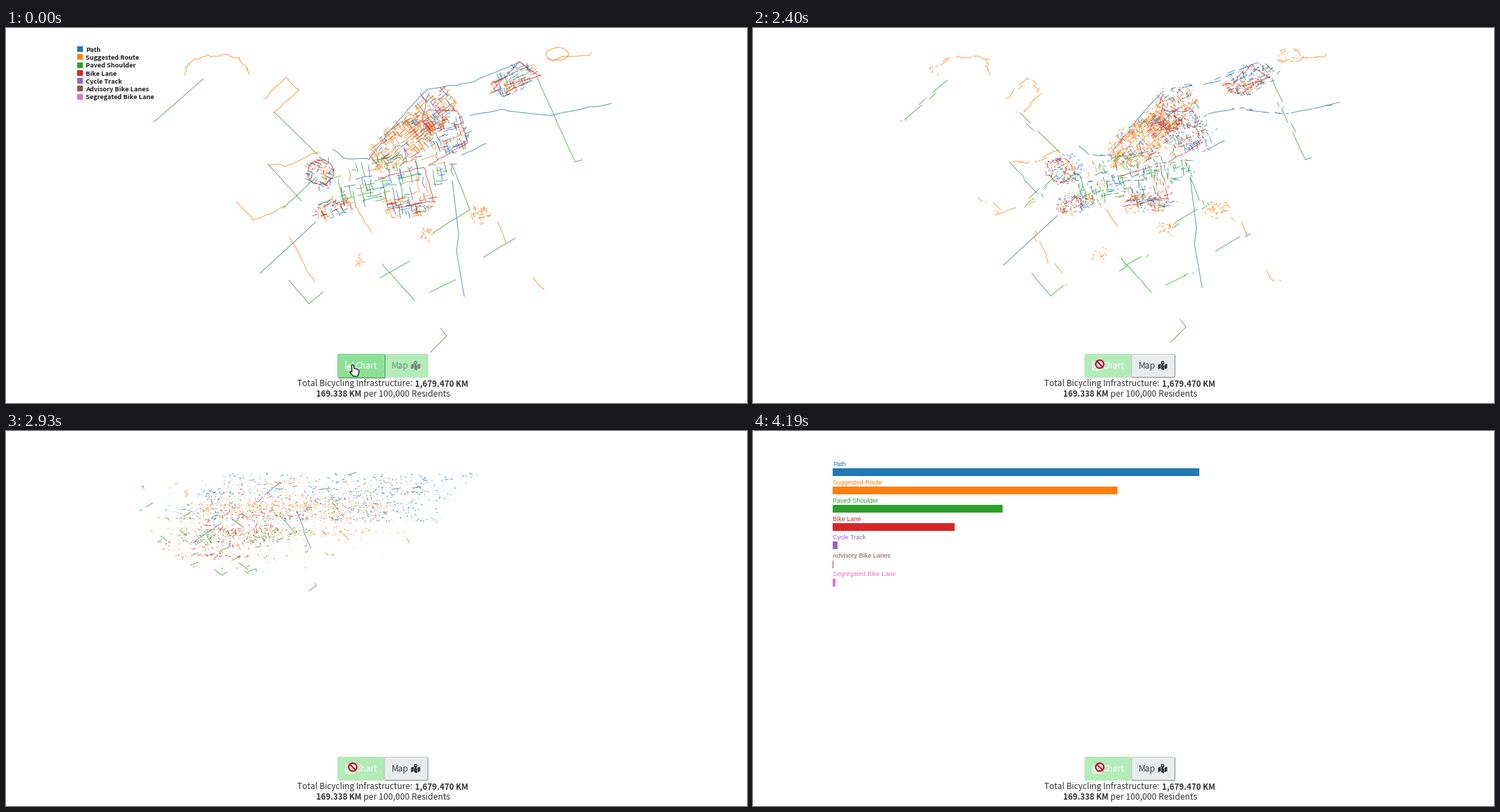
A matplotlib script for the animation above (6.04 s loop, 1051x533 px).

```python
import matplotlib.pyplot as plt
import numpy as np
from matplotlib.animation import FuncAnimation
from matplotlib.patches import Circle, FancyBboxPatch, Polygon, Rectangle

W, H, DPI = 1051, 533, 64
LOOP, TICK = 6040, 20
PX = 72 / DPI
SANS, ARIAL = "Noto Sans CJK JP", "Liberation Sans"
PRESS, CLICK, REFRESH = 1960, 2070, 66
STALL = (3000, 3170)

# Route kinds: key, name, length of the bar
KINDS = [("b", "Path", 520), ("o", "Suggested Route", 404),
         ("g", "Paved Shoulder", 241), ("r", "Bike Lane", 173),
         ("c", "Cycle Track", 7), ("a", "Advisory Bike Lanes", 1),
         ("s", "Segregated Bike Lane", 3.6)]
BAR_X, BAR_Y, BAR_H, BAR_STEP = 113, 53, 11, 26.1

# Key points of the main roads
ROADS = {
    "g": [[(209, 134), (247, 101), (280, 72)], [(380, 119), (442, 180)],
          [(371, 193), (419, 246)], [(393, 256), (440, 212)],
          [(401, 358), (430, 392), (450, 375)], [(531, 355), (573, 331)],
          [(533, 335), (580, 388)], [(600, 376), (638, 358)],
          [(677, 326), (723, 298)], [(606, 291), (658, 258), (632, 192)],
          [(752, 68), (807, 190), (818, 187)]],
    "o": [[(363, 102), (397, 71), (415, 88), (380, 120)],
          [(371, 193), (398, 196), (445, 175)],
          [(327, 247), (352, 273), (395, 255)], [(402, 296), (436, 360)],
          [(519, 292), (497, 255)], [(697, 276), (709, 305)],
          [(766, 45), (831, 36)], [(750, 355), (761, 371)]],
    "b": [[(515, 187), (545, 145), (597, 87), (660, 78), (728, 48), (745, 64)],
          [(658, 124), (705, 116), (770, 124), (859, 107)],
          [(464, 172), (480, 185), (515, 187)], [(646, 182), (681, 164)]],
    "r": [[(528, 214), (593, 198), (608, 246), (540, 258)],
          [(601, 92), (590, 130), (604, 152)],
          [(600, 118), (640, 117), (655, 163), (600, 194)],
          [(690, 88), (728, 48), (757, 69), (705, 82)]],
}
WOBBLE = {"g": 0.2, "o": 1.2, "b": 0.6, "r": 0.8}
PIECE = {"g": 17, "o": 9, "b": 12, "r": 6}

# Town areas: mix of kinds, centre, radii, street angle
TOWNS = [("ooooobr", 562, 163, 52, 27, -38), ("ooobbr", 603, 120, 42, 24, -38),
         ("oobbbr", 628, 150, 28, 30, -20), ("oobbbr", 718, 74, 36, 18, -25),
         ("obbbr", 445, 206, 20, 22, 25), ("oobbr", 464, 256, 30, 14, -22),
         ("oobbr", 573, 252, 36, 16, -12), ("o", 597, 295, 10, 9, 40),
         ("o", 672, 266, 13, 13, -15), ("o", 502, 331, 7, 8, -30)]

rng = np.random.default_rng(7)
runs = {key: [] for key, _, _ in KINDS}


def ellipse(cx, cy, rx, ry, turns=1.0, n=14):
    a = np.pi * (1 + 2 * turns * np.linspace(0, 1, n))
    return np.c_[cx + rx * np.cos(a), cy + ry * np.sin(a)]


def trace(pts, s, d):
    return np.c_[np.interp(s, d, pts[:, 0]), np.interp(s, d, pts[:, 1])]


def distance(pts):
    return np.r_[0, np.cumsum(np.hypot(*np.diff(pts, axis=0).T))]


def add_path(key, pts, step=1e4, wobble=0, slot=None):
    """Cut a route at random into runs; slot is the place along the bar."""
    pts = np.array(pts, float)
    d = distance(pts)
    if wobble:
        s = np.union1d(d, np.arange(0, d[-1], 9))
        pts = trace(pts, s, d) + rng.normal(0, wobble, (len(s), 2))
        d = distance(pts)
    cuts = np.sort(np.r_[0, rng.uniform(0, d[-1], round(d[-1] / step)), d[-1]])
    for a, b in zip(cuts, cuts[1:]):
        run = trace(pts, np.r_[a, d[(d > a) & (d < b)], b], d)
        if run[0, 0] > run[-1, 0]:
            run = run[::-1]
        runs[key].append((rng.random() if slot is None else slot, run))


def add_town(mix, cx, cy, rx, ry, deg, density=0.14):
    """Short streets on a turned grid inside an ellipse."""
    c, s = np.cos(np.radians(deg)), np.sin(np.radians(deg))
    for _ in range(int(rx * ry * density)):
        r, a = np.sqrt(rng.random()), rng.uniform(0, 2 * np.pi)
        mid = r * np.array([rx * np.cos(a), ry * np.sin(a)])
        axis = int(rng.random() < 0.45)
        mid[1 - axis] = 4 * round(mid[1 - axis] / 4)
        half = np.zeros(2)
        half[axis] = rng.uniform(1.5, 3 + rx / 10)
        pts = np.array([mid - half, mid, mid + half]) + rng.normal(0, 0.8, (3, 2))
        add_path(rng.choice(list(mix)), pts @ [[c, s], [-s, c]] + (cx, cy),
                 2.5 + rx / 20)


for town in TOWNS:
    add_town(*town)
add_town("bbbgggo", 545, 212, 95, 32, -12, density=0.035)
for key, roads in ROADS.items():
    for road in roads:
        add_path(key, road, PIECE[key], WOBBLE[key])
add_path("o", ellipse(299, 66, 46, 28, 0.5), 9, 1.5)
add_path("o", ellipse(782, 37, 16, 9), 9, 0.5)
add_path("r", ellipse(446, 205, 19, 18), 6, 0.6)
add_path("b", [(360, 349), (440, 275)], slot=0.25)
add_path("b", [(633, 217), (642, 293), (639, 317), (650, 382)], slot=0.38)
add_path("g", [(602, 461), (625, 438), (616, 426)], slot=1)
for key in "cas":
    add_path(key, ellipse(595, 140, 12, 8, 0.3), 4)


def bar_base(i):
    return BAR_Y + BAR_STEP * i + BAR_H


def layout(i):
    """Map and chart points of one kind, runs parted by NaN rows."""
    key, _, width = KINDS[i]
    ordered = [run for _, run in sorted(runs[key], key=lambda item: item[0])]
    scale = width / sum(distance(run)[-1] for run in ordered)
    gap = np.full((1, 2), np.nan)
    start, end, x = [], [], BAR_X
    for run in ordered:
        d = distance(run) * scale
        start += [run, gap]
        end += [np.c_[x + d, np.full(len(d), bar_base(i))], gap]
        x += d[-1]
    return np.vstack(start), np.vstack(end)


fig = plt.figure(figsize=(W / DPI, H / DPI), dpi=DPI, facecolor="white")
ax = fig.add_axes([0, 0, 1, 1])
ax.set(xlim=(0, W), ylim=(H, 0))
ax.axis("off")


def text(x, y, s, px, color="#333333", font=SANS, **kw):
    return ax.text(x, y, s, fontsize=px * PX, color=color, family=font,
                   va="baseline", **kw)


def line(pts, color, px=1, **kw):
    x, y = zip(*pts)
    return ax.plot(x, y, color=color, lw=px * PX, **kw)[0]


def shape(patch, color, edge="none", px=0, **kw):
    patch.set(facecolor=color, edgecolor=edge, linewidth=px * PX, **kw)
    return ax.add_patch(patch)


def button(x, w):
    box = FancyBboxPatch((x, 463.5), w, 33, boxstyle="round,pad=0,rounding_size=2.5")
    return shape(box, "white", px=1)


# Map routes, bars, captions and legend
layouts = [layout(i) for i in range(len(KINDS))]
routes, bars, captions, legend = [], [], [], []
for i, (_, name, width) in enumerate(KINDS):
    color = f"C{i}"
    routes.append(line(layouts[i][0], color, alpha=0.75, solid_capstyle="butt"))
    bars.append(shape(Rectangle((BAR_X, bar_base(i)), width, 0), color))
    captions.append(text(BAR_X, 49.5 + BAR_STEP * i, name, 9, color, ARIAL))
    y = 30.2 + 11.25 * i
    legend.append(shape(Rectangle((101, y - 4), 8, 8), color))
    legend.append(text(113, y + 3.6, name, 9.1, "#1a1a1a", weight="bold"))

# Buttons
chart_box, map_box = button(470.5, 66.5), button(537, 61.5)
chart_edge = line([(471, 496.5), (536.5, 496.5), (536.5, 464)], "#3f9a55")
map_edge = line([(538, 496.5), (597, 496.5), (598.5, 495), (598.5, 465)], "#85888b")
line([(481.5, 474), (481.5, 485.5), (494, 485.5)], "white", 1.5)
for i, top in enumerate([480, 476.5, 479, 475]):
    x = 484.5 + 2.5 * i
    line([(x, 483.5), (x, top)], "white", 1.6, solid_capstyle="butt")
text(526.5, 484.3, "Chart", 12, "white", ha="right")
map_ink = [text(547, 484.3, "Map", 12)]
for x, tilt in [(574.5, -1.5), (579, 1.5), (583.5, -1.5)]:
    panel = [(x, 478.5), (x + 4, 478.5 + tilt), (x + 4, 485 + tilt), (x, 485)]
    map_ink.append(shape(Polygon(panel), "#333333"))
map_ink.append(shape(Polygon([(578.5, 476), (583.5, 476), (581, 481)]), "#333333"))
map_ink.append(shape(Circle((581, 475.5), 2.4), "#333333"))
map_hole = shape(Circle((581, 475.4), 0.9), "white")

# Totals
text(413, 509.3, "Total Bicycling Infrastructure:", 11.8)
text(656, 509.3, "1,679.470 KM", 11.5, weight="bold", ha="right")
text(439.5, 524.3, "169.338 KM", 11.4, weight="bold")
text(630, 524.3, "per 100,000 Residents", 12, ha="right")

# Pointers
glow = shape(Circle((491.5, 477.5), 10.5), "#dcdc00", alpha=0.7, zorder=5)
hand = shape(Polygon([(490.3, 479.5), (491.7, 478.3), (493.2, 479.5), (493.6, 484),
                      (498, 485), (500.6, 487), (500.4, 491), (498.6, 495),
                      (492.6, 495), (488, 489.6), (488.4, 487.6), (490.8, 489)]),
             "white", "black", 1.1, zorder=6)
stop = [shape(Circle((491.8, 477.8), 5.6), "white", "#c4122f", 2.2, zorder=6),
        line([(487.9, 473.9), (495.7, 481.7)], "#c4122f", 2.2, zorder=6)]


def ramp(t, start, length):
    return float(np.clip((t - start) / length, 0, 1))


def cubic(u):
    return 4 * u ** 3 if u < 0.5 else 1 - 4 * (1 - u) ** 3


def refreshed(now):
    """Time of the last screen refresh, with one short stall."""
    if STALL[0] <= now < STALL[1]:
        now = STALL[0]
    return now - (now - CLICK) % REFRESH if now >= CLICK else now


def draw(frame):
    t = refreshed(frame * TICK + TICK // 2)
    clicked = t >= CLICK

    p = cubic(ramp(t, 2076, 1500))
    for art, (a, b) in zip(routes, layouts):
        art.set_data(*(a * (1 - p) + b * p).T)
        art.set_visible(p < 1)

    grow = 1 - (1 - ramp(t, 3545, 440)) ** 3
    for i, bar in enumerate(bars):
        bar.set_y(bar_base(i) - BAR_H * grow)
        bar.set_height(BAR_H * grow)
        bar.set_visible(p == 1)
    for art in captions:
        art.set_alpha(ramp(t, 3720, 440))
    for art in legend:
        art.set_alpha(1 - ramp(t, CLICK, 250))

    idle = "#e9ebed" if clicked else "#b3ebb9"
    chart_box.set_facecolor("#b3ebb9" if clicked else "#8ce096")
    chart_box.set_edgecolor("#b3ebb9" if clicked else "#82d28d")
    chart_edge.set_visible(not clicked)
    map_box.set_facecolor(idle)
    map_box.set_edgecolor("#c4c7ca" if clicked else idle)
    map_edge.set_visible(clicked)
    map_hole.set_facecolor(idle)
    for art in map_ink:
        art.set_color("#343a40" if clicked else "#77897b")

    glow.set_visible(PRESS <= t < CLICK)
    hand.set_visible(not clicked)
    for art in stop:
        art.set_visible(clicked)


anim = FuncAnimation(fig, draw, frames=LOOP // TICK, interval=TICK,
                     repeat=True, repeat_delay=0)
plt.show()
```
